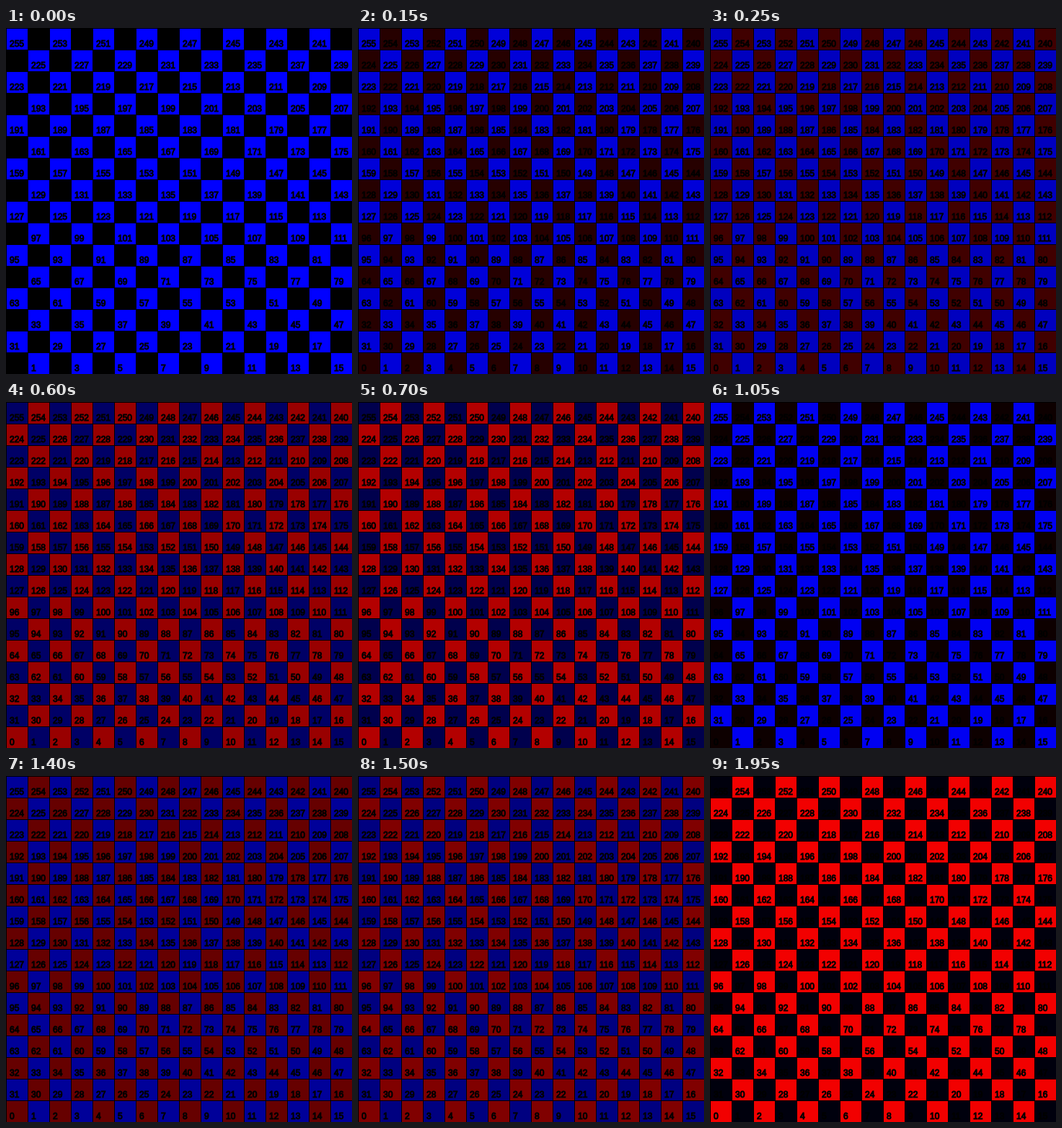
An HTML page for the animation above (2 s loop, 480 by 480 pixels).

```html
<!DOCTYPE html>
<html lang="en">
<head>
<meta charset="utf-8">
<title>Serpentine grid</title>
<style>
  html, body { margin: 0; width: 100%; height: 100%; overflow: hidden; background: #000; }
  svg { display: block; width: 480px; height: 480px; }
  g { stroke: #000; stroke-width: 1px; }
  text { fill: #000; font: 12px "Liberation Sans", Arial, sans-serif; }
  #even { animation: rise 1s steps(20) infinite; }
  #odd { animation: fall 1s steps(20) infinite; }
  @keyframes rise { from { fill: #000; } to { fill: #f00; } }
  @keyframes fall { from { fill: #00f; } to { fill: #000; } }
</style>
</head>
<body>
<svg viewBox="0 0 480 480">
  <g id="even"></g>
  <g id="odd"></g>
</svg>
<script>
  const SIDE = 16, CELL = 30;
  const groups = [document.getElementById("even"), document.getElementById("odd")];

  function add(parent, tag, attrs, content = "") {
    const node = document.createElementNS("http://www.w3.org/2000/svg", tag);
    for (const key in attrs) node.setAttribute(key, attrs[key]);
    node.textContent = content;
    parent.append(node);
  }

  // Numbers wind upwards from the bottom left, turning at each row end.
  for (let n = 0; n < SIDE * SIDE; n++) {
    const row = Math.floor(n / SIDE), step = n % SIDE;
    const x = (row % 2 ? SIDE - 1 - step : step) * CELL;
    const y = (SIDE - 1 - row) * CELL;
    const group = groups[n % 2];
    add(group, "rect", { x: x + 0.5, y: y + 0.5, width: CELL, height: CELL });
    add(group, "text", { x: x + 5, y: y + 26 }, n);
  }
</script>
</body>
</html>
```
